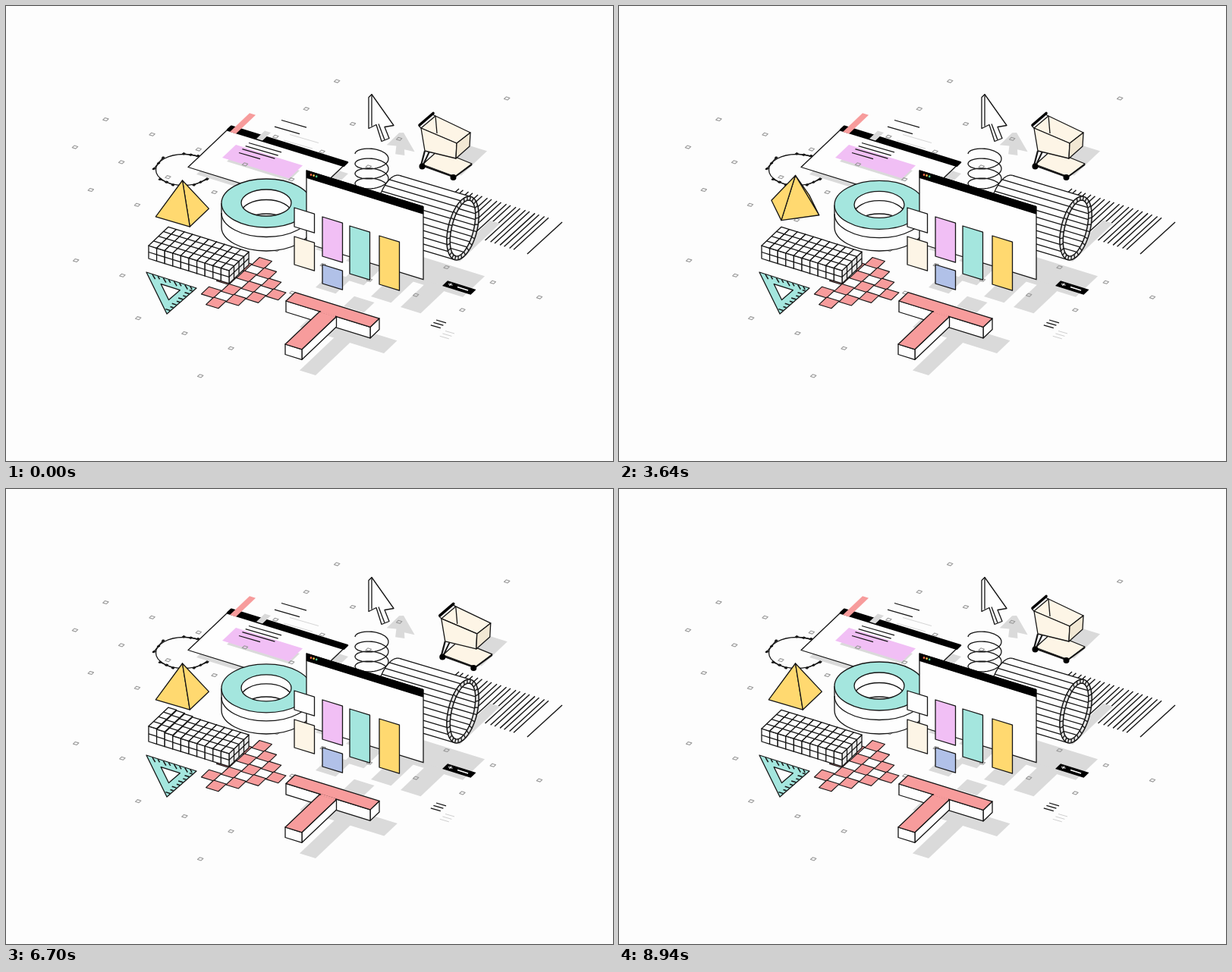
An HTML page with a canvas for the animation above (8960 ms loop, 800x600 px).

```html
<!DOCTYPE html>
<html lang="en">
<head>
<meta charset="utf-8">
<title>Isometric shapes</title>
<style>
html, body { margin: 0; width: 100%; height: 100%; overflow: hidden; background: #fdfdfd; }
canvas { display: block; }
</style>
</head>
<body>
<canvas id="stage" width="800" height="600"></canvas>
<script>
const ctx = document.getElementById('stage').getContext('2d');
const LOOP = 8960, TAU = Math.PI * 2, DEG = Math.PI / 180;
const INK = '#151515', WHITE = '#fefefe', SHADE = '#dadada', TEAL = '#a4e6de', CORAL = '#f79c9c',
  YELLOW = '#ffd970', CREAM = '#fdf5e6', LILAC = '#f1bff5', BLUE = '#b1c1e8';

// The two ground axes: "a" runs right and down, "b" runs right and up.
const FALL = 0.31, RISE = 0.95;

// Smooth rise and fall between start and start + span.
function bell(t, start, span) {
  const u = (t - start) / span;
  return u > 0 && u < 1 ? Math.sin(Math.PI * u) ** 2 : 0;
}

function paint(fill, stroke, width = 1.3) {
  if (fill) { ctx.fillStyle = fill; ctx.fill(); }
  if (stroke) { ctx.strokeStyle = stroke; ctx.lineWidth = width; ctx.stroke(); }
}

function poly(points, fill, stroke, width) {
  ctx.beginPath();
  for (const p of points) ctx.lineTo(...p);
  ctx.closePath();
  paint(fill, stroke, width);
}

function line(x1, y1, x2, y2, stroke = INK, width = 1.3) {
  ctx.beginPath();
  ctx.moveTo(x1, y1);
  ctx.lineTo(x2, y2);
  paint(null, stroke, width);
}

function oval(x, y, rx, ry, fill, stroke, from = 0, to = TAU) {
  ctx.beginPath();
  ctx.ellipse(x, y, rx, ry, 0, from, to);
  paint(fill, stroke);
}

// A parallelogram with edge vectors u and v, split into m by n cells.
function grid(x, y, u, v, fill, stroke, m = 1, n = 1, width = 1.3) {
  const at = (f, g) => [x + u[0] * f + v[0] * g, y + u[1] * f + v[1] * g];
  poly([at(0, 0), at(1, 0), at(1, 1), at(0, 1)], fill, stroke, width);
  for (let i = 1; i < m; i++) line(...at(i / m, 0), ...at(i / m, 1), stroke, width);
  for (let j = 1; j < n; j++) line(...at(0, j / n), ...at(1, j / n), stroke, width);
}

const alongA = a => [a, a * FALL], alongB = b => [b, -b * RISE];

// Flat on the ground, from its left corner.
const slab = (x, y, a, b, fill, stroke, width) =>
  grid(x, y, alongA(a), alongB(b), fill, stroke, 1, 1, width);

// Upright, facing the viewer, from its top left corner.
const panel = (x, y, a, h, fill, stroke) => grid(x, y, alongA(a), [0, h], fill, stroke);

// A block with its top's left corner at x, y, and cells along a, b and its height.
function block(x, y, a, b, h, top, side, na = 1, nb = 1, nh = 1) {
  const [ax, ay] = alongA(a);
  grid(x + ax, y + ay, alongB(b), [0, h], side, INK, nb, nh);
  grid(x, y, [ax, ay], [0, h], WHITE, INK, na, nh);
  grid(x, y, [ax, ay], alongB(b), top, INK, na, nb);
}

// Rows of writing along the a axis.
function rows(x, y, count, length, step, color = INK, width = 1.3) {
  for (let i = 0; i < count; i++) {
    const px = x - i * step, py = y + i * step * RISE;
    line(px, py, px + length, py + length * 0.29, color, width);
  }
}

function shifted(dx, dy, draw) {
  ctx.save();
  ctx.translate(dx, dy);
  draw();
  ctx.restore();
}

// A lattice of floor marks; each row spans a range of columns.
const FIRST = [6, 4, 2, 3, 1, 0, 0, 3, 3, 3, 6], LAST = [6, 6, 5, 7, 9, 10, 7, 6, 5, 3, 6];

function marks() {
  FIRST.forEach((first, i) => {
    const row = i - 5;
    for (let col = first; col <= LAST[i]; col++)
      slab(91 + col * 61.2 + row * 40.4 - 3.7, 186 + col * 19.8 - row * 36.6 + 0.7, 4.6, 2.8, null, '#9a9a9a', 1.1);
  });
}

function stripes() {
  const stripe = u => line(597 + 136 * u, 241 + 44 * u, 551 + 136 * u, 283 + 44 * u, INK, 1.4);
  for (let k = 0; k < 10; k++) {
    stripe(k * 0.092);
    stripe(k * 0.092 + 0.04);
  }
  stripe(1);
}

function nodeCircle() {
  const x = 234, y = 216, rx = 36.5, ry = 20.5;
  oval(x, y, rx, ry, null, INK);
  for (const deg of [205, 285, 128, 52]) {
    const cos = Math.cos(deg * DEG), sin = Math.sin(deg * DEG);
    const size = 9.5 / Math.hypot(rx * sin, ry * cos);
    const dx = -rx * sin * size, dy = ry * cos * size;
    const px = x + rx * cos, py = y + ry * sin;
    line(px - dx, py - dy, px + dx, py + dy);
    for (const end of [-1, 0, 1]) slab(px + dx * end - 2, py + dy * end + 0.5, 2.4, 1.8, INK, INK, 1);
  }
}

function backWindow() {
  slab(251, 222, 150, 50, SHADE);
  slab(240, 212.5, 153, 56, WHITE, INK);
  slab(292, 163.5, 153, 5, '#000', '#000', 2.5);
  slab(291, 205, 82, 14, SHADE);
  slab(285, 200, 88, 18, LILAC);
  rows(320, 180.5, 3, 43, 4.3);
  rows(307, 193.5, 1, 28, 0);
  slab(330, 175, 8, 11, SHADE);
  slab(295, 166, 8, 26, CORAL);
  rows(363, 150.5, 2, 33, 9);
  rows(374, 169.5, 2, 38, 8, '#d5d5d5', 1);
}

function ring(t) {
  const drop = 3 * (1 - Math.cos(TAU * 3 * t / LOOP));
  const x = 343, top = 260 + drop, mid = 273 + drop / 2, base = 291.5;
  ctx.beginPath();
  ctx.moveTo(x + 59, top);
  ctx.ellipse(x, base, 59, 31.5, 0, 0, Math.PI);
  ctx.lineTo(x - 59, top);
  paint(WHITE, INK);
  oval(x, mid, 59, 31.5, null, INK, 0, Math.PI);
  oval(x, top, 59, 32, TEAL, INK);
  ctx.save();
  oval(x, top - 0.5, 33, 17.5, WHITE);
  ctx.clip();
  oval(x, mid, 33, 17.5, null, INK);
  oval(x, base, 33, 17.5, null, INK);
  ctx.restore();
  oval(x, top - 0.5, 33, 17.5, null, INK);
}

function pyramid(t) {
  const u = Math.min(1, Math.max(0, (t - 2731) / 2780));
  const turn = (254 - 90 * (1 - Math.cos(Math.PI * u))) * DEG;
  const lift = 12 * bell(t, 2975, 2525);
  const apex = [232.5, 230 - lift];
  const corner = k => {
    const a = turn + k * Math.PI / 2;
    return [232.3 + 36.4 * Math.cos(a), 272.5 - lift + 19.3 * Math.sin(a)];
  };
  for (let k = 0; k < 4; k++) {
    const p = corner(k), q = corner(k + 1);
    const facing = (q[0] - p[0]) * (apex[1] - p[1]) - (q[1] - p[1]) * (apex[0] - p[0]);
    if (facing > 0) poly([apex, p, q], YELLOW, INK);
  }
}

function setSquare() {
  const corners = [[185, 351], [251, 372], [212, 406]], cx = 216, cy = 376.3;
  const inset = scale => corners.map(([x, y]) => [cx + (x - cx) * scale, cy + (y - cy) * scale]);
  poly(corners, TEAL, INK);
  poly(inset(0.38), WHITE, INK);
  // Ruler ticks run inward from the two edges that meet at the right corner.
  const outer = inset(0.97), right = outer[1];
  for (const [far, dx, dy] of [[outer[0], 0.6, 1], [outer[2], -1, -0.3]])
    for (let i = 1; i < 9; i++) {
      const u = i / 9, n = i % 2 ? 4 : 6;
      const x = right[0] + (far[0] - right[0]) * u, y = right[1] + (far[1] - right[1]) * u;
      line(x, y, x + dx * n, y + dy * n, INK, 1.5);
    }
}

function tiles() {
  for (let r = 0; r < 4; r++)
    for (let c = Math.max(0, 2 - r); c < 4; c++)
      slab(245 + r * 6.2 + c * 26.3, 352.3 + r * 13.8 - c * 3.7, 16.3, 10.2, CORAL, INK, 1.1);
}

function keyboard(t) {
  for (let i = 0; i < 10; i++) {
    const lift = 3.5 * bell(t, 6350 + i * 90, 850);
    block(188 + i * 10.6, 316 + i * 10.6 * FALL - lift, 10.6, 26, 17 + lift, WHITE, '#e9e9e9', 1, 4, 2);
  }
}

function tee(t) {
  const stem = 6 * bell(t, 4600, 2000), bar = 5 * bell(t, 5050, 1850);
  slab(387 + bar * 0.6, 423.5 - bar * 0.6, 111, 17.5, SHADE);
  slab(387 + stem * 0.6, 480.5 - stem * 0.6, 21, 60, SHADE);
  block(369, 389 - bar, 111, 12, 14.5, CORAL, WHITE);
  block(368, 446 - stem, 22, 45.5, 13.5, CORAL, WHITE);
  line(415, 403.2 - stem, 434, 409.2 - stem, CORAL, 2.4);
}

function spring(t) {
  const top = 195 + 11 * bell(t, 4540, 1360), turns = 4;
  ctx.beginPath();
  for (let i = 0; i <= 160; i++) {
    const u = i / 160, a = Math.PI + u * turns * TAU;
    ctx.lineTo(482 + 22 * Math.cos(a), top + (247 - top) * u + 10 * Math.sin(a));
  }
  paint(null, INK);
}

// A point on the tube's tilted mouth.
const TILT = 14 * DEG, HOLE = 0.76, BACK = [-94, -28];
function rim(a, scale = 1) {
  const x = 19 * scale * Math.cos(a), y = 43 * (1 + scale) / 2 * Math.sin(a);
  return [602 + x * Math.cos(TILT) - y * Math.sin(TILT), 293 + x * Math.sin(TILT) + y * Math.cos(TILT)];
}

function rimPath(scale = 1) {
  ctx.beginPath();
  for (let i = 0; i < 72; i++) ctx.lineTo(...rim(i * TAU / 72, scale));
  ctx.closePath();
}

// Evenly spaced lengthwise lines, on the outer left side or the inner right side.
function staves(side, scale) {
  for (let k = -5; k <= 5; k++) {
    const a = Math.asin(k / 5);
    const [x, y] = rim(side < 0 ? Math.PI - a : a, scale);
    line(x, y, x + BACK[0], y + BACK[1]);
  }
}

function tube() {
  slab(585, 333, 13, 53, SHADE);
  shifted(...BACK, () => {
    rimPath();
    paint(WHITE, INK);
  });
  const [x, y] = rim(Math.PI / 2), [topX, topY] = rim(-Math.PI / 2);
  grid(x, y, [topX - x, topY - y], BACK, WHITE);
  staves(-1, 1);
  rimPath();
  paint('#e4e4e4', INK, 1.5);
  for (let i = 0; i < 28; i++) line(...rim(i * TAU / 28), ...rim(i * TAU / 28, HOLE));
  ctx.save();
  rimPath(HOLE);
  paint(WHITE);
  ctx.clip();
  staves(1, HOLE);
  ctx.restore();
  rimPath(HOLE);
  paint(null, INK, 1.5);
}

function frontWindow() {
  panel(396, 217, 154, 96, WHITE, INK);
  panel(396.5, 217, 153, 9.5, '#000', '#000');
  ['#f2704e', '#f3c14b', '#52c78a'].forEach((c, i) => oval(402 + i * 3.6, 222.5 + i * 1.1, 1.3, 1.5, c));
}

const CARD = 26.5;
const CARDS = [
  { x: 380, y: 266, h: 25, fill: WHITE, start: 150 },
  { x: 380, y: 304, h: 37, fill: CREAM, start: 150 },
  { x: 417, y: 278, h: 52, fill: LILAC, start: 200 },
  { x: 417, y: 341, h: 25, fill: BLUE, start: 500 },
  { x: 453, y: 290, h: 63, fill: TEAL, start: 1000 },
  { x: 492, y: 303, h: 64, fill: YELLOW, start: 1520 }
];

function eachCard(t, draw) {
  for (const card of CARDS) {
    const push = 7 * bell(t, card.start, 1700);
    shifted(-push, push * 0.85, () => draw(card));
  }
}

function cardShadows(t) {
  slab(448, 336, 154, 29, SHADE);
  eachCard(t, ({ x, y, h }) => slab(x + 28, y + h + 30, CARD, h * 0.56, SHADE));
}

function cards(t) {
  eachCard(t, ({ x, y, h, fill }) => panel(x, y, CARD, h, fill, INK));
}

function label() {
  slab(575, 369, 37.5, 7, '#000');
  line(583, 366.5, 588.5, 368.3, '#fff', 1.2);
  line(587, 365.5, 584.5, 369, '#fff', 1.2);
  line(595, 370.5, 609, 375, '#fff', 1.5);
  rows(567, 414, 3, 13, 3.6);
  rows(579, 428.5, 3, 12, 3.6, '#cfcfcf', 1);
}

// Pointer outline, measured from its tip.
const POINTER = [[0, 0], [29, 41], [17, 43], [23, 58], [13, 62], [6, 40], [-4, 45], [-4, 4]];

function pointerShadow() {
  ctx.save();
  ctx.transform(1.07, 0.32, -0.4, 0.39, 524, 167);
  poly(POINTER, SHADE);
  ctx.restore();
}

function pointer() {
  shifted(482, 116.5, () => {
    poly(POINTER, WHITE, INK);
    line(0, 0, 0, 42);
    line(9, 39, 17, 60);
  });
}

function cart(t) {
  const roll = 30 * bell(t, 5600, 2800);
  const left = [547, 161], back = [566, 145], right = [612, 167], front = [594, 181];
  const low = [593, 201], lowLeft = [552, 191], lowRight = [611, 185], inner = [568, 168];
  shifted(roll, roll * 0.37, () => {
    slab(566, 213, 34, 34, SHADE);
    poly([[549, 209], [570, 190], [614, 208], [592, 225]], CREAM, INK);
    line(549, 210.5, 592, 226, INK, 2);
    line(592, 225, 614, 209, INK, 2);
    line(...lowLeft, 547, 210, INK, 2.2);
    line(558, 192, 549, 211, INK, 2);
    for (const [x, y] of [[548.5, 211.5], [589.5, 226]]) oval(x, y, 4, 4, '#000');
    poly([left, back, right, front], CREAM, INK);
    line(...back, ...inner);
    poly([left, front, low, lowLeft], CREAM, INK);
    poly([front, right, lowRight, low], '#f2e8d4', INK);
    ctx.lineCap = 'round';
    line(545, 157, 563, 141.5, '#000', 3.6);
    ctx.lineCap = 'butt';
    line(544, 158, ...left);
    line(562, 143, ...back);
  });
}

const SCENE = [stripes, cardShadows, pointerShadow, nodeCircle, backWindow, marks, ring, pyramid, setSquare,
  tiles, keyboard, tee, spring, tube, frontWindow, cards, label, pointer, cart];

const began = performance.now();
ctx.lineJoin = 'round';

function tick() {
  const t = (performance.now() - began) % LOOP;
  ctx.fillStyle = '#fdfdfd';
  ctx.fillRect(0, 0, 800, 600);
  for (const part of SCENE) part(t);
  requestAnimationFrame(tick);
}
tick();
</script>
</body>
</html>
```
